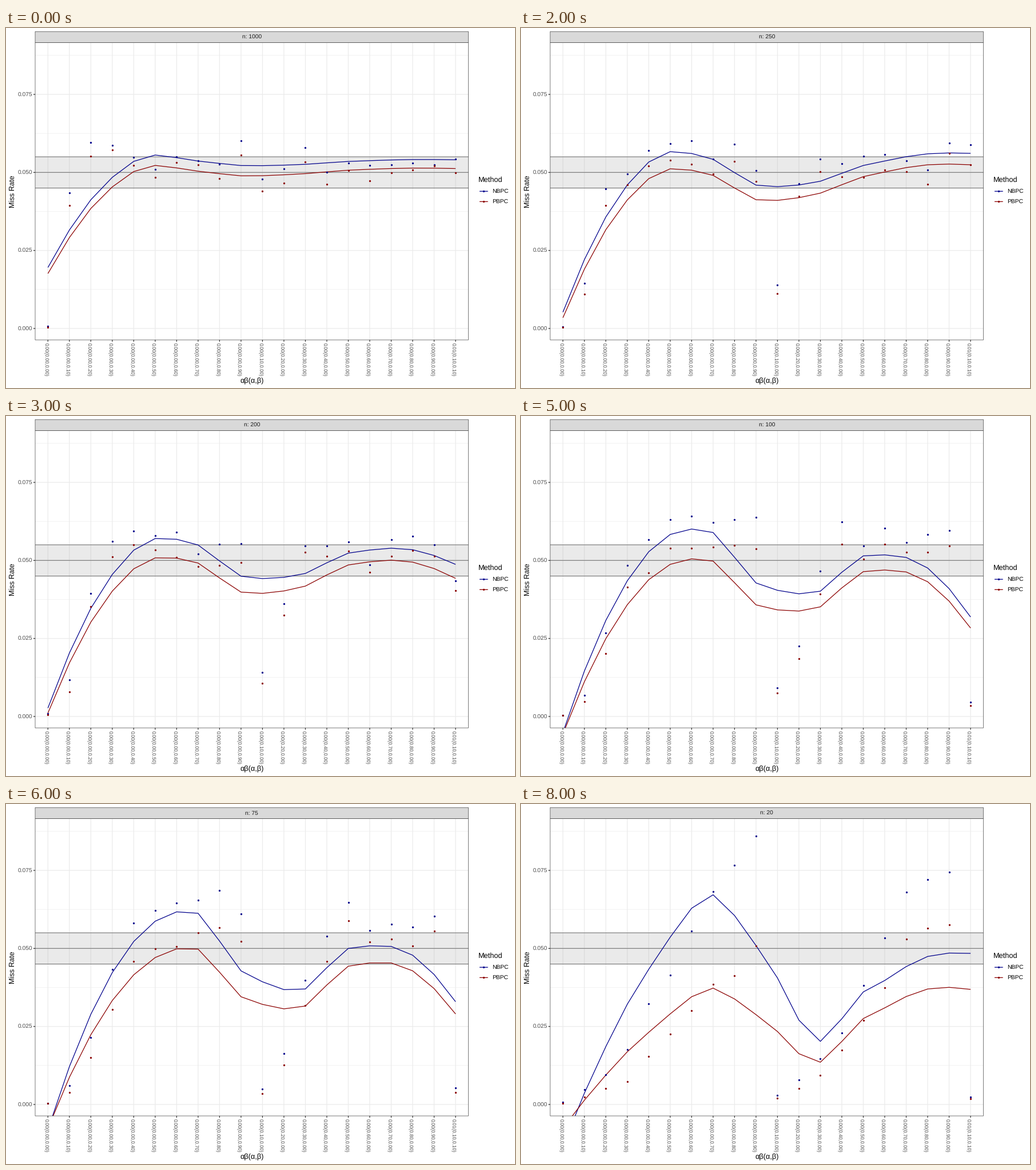
A matplotlib script for the animation above (9000 ms loop, 890x629 px).

```python
import math

import numpy as np
import matplotlib.pyplot as plt
from matplotlib.animation import FuncAnimation
from matplotlib.patches import Rectangle

W, H, DPI = 890, 629, 100
PT = 72 / DPI  # points per pixel
LEFT, RIGHT, TOP, BOTTOM = 51.0, 808.5, 25.5, 545.0
MID = (LEFT + RIGHT) / 2
DARK, GRID, INK = "#333333", "#EBEBEB", "#4D4D4D"
LW, EDGE = 1.25, 0.65
BIG, SMALL, TINY = 12.8, 10.25, 8.7  # text sizes in pixels

plt.rcParams.update({"font.family": "Liberation Sans", "text.hinting": "none"})

SIZES = [1000, 500, 250, 200, 150, 100, 75, 50, 20]
REPS = 5000

# (alpha, beta): beta alone rises, then alpha alone, then both are 0.1
X = np.arange(20)
ALPHA = np.where(X > 9, (X - 9) / 10, 0)
BETA = np.where(X < 10, X / 10, 0)
ALPHA[-1] = BETA[-1] = 0.1

# Large-sample rate, small-sample excess when beta or alpha rises, and threshold
METHODS = {
    "NBPC": dict(color="#00008B", base=0.0535, beta=0.68, alpha=0.52, cut=2.20),
    "PBPC": dict(color="#8B0000", base=0.0510, beta=0.00, alpha=0.25, cut=2.33),
}

normal_cdf = np.vectorize(lambda z: 0.5 * (1 + math.erf(z / math.sqrt(2))))


def miss_rate(n, base, beta, alpha, cut):
    """Expected rate: a level times the power to detect the larger effect."""
    level = base + np.where(ALPHA > 0, alpha, beta) / n
    signal = np.maximum(ALPHA, BETA) * math.sqrt(n)
    power = normal_cdf(signal - cut)
    both = (ALPHA > 0) & (BETA > 0)
    power = power + both * normal_cdf(5.5 * (signal - 1.4))
    return level * np.minimum(power, 1)


def simulate(n, rate, shared, rng):
    """Rates from REPS runs; both methods see mostly the same noise."""
    z = 0.95 * shared + 0.3 * rng.standard_normal(len(X))
    noisy = rate + z * np.sqrt(rate * (1 - rate) / REPS)
    return np.maximum(np.round(noisy * REPS), 2) / REPS


KNOTS = np.array([-0.095, 2, 4, 7, 9, 12, 14, 17, 19.095])
SPAN = 15  # neighbours in each local fit


def local_fit(v, y):
    """Value and slope at v of a tricube-weighted local quadratic."""
    d = np.abs(X - v)
    w = np.clip(1 - (d / np.sort(d)[SPAN - 1]) ** 3, 0, 1) ** 3
    _, slope, value = np.polyfit(X - v, y, 2, w=np.sqrt(w))
    return value, slope


def loess(y):
    """Local fits at the knots, joined by cubic Hermite pieces."""
    val, slope = np.array([local_fit(v, y) for v in KNOTS]).T
    i = np.searchsorted(KNOTS, X, side="right") - 1
    step = KNOTS[i + 1] - KNOTS[i]
    t = (X - KNOTS[i]) / step
    return (val[i] * (1 + 2 * t) * (1 - t) ** 2
            + val[i + 1] * t * t * (3 - 2 * t)
            + step * slope[i] * t * (1 - t) ** 2
            - step * slope[i + 1] * t * t * (1 - t))


def px(i):
    return 73.3 + 37.515 * np.asarray(i)


def py(v):
    return 525.0 - 5453 * np.asarray(v)


fig = plt.figure(figsize=(W / DPI, H / DPI), dpi=DPI, facecolor="white")
ax = fig.add_axes([0, 0, 1, 1])
ax.set_xlim(0, W)
ax.set_ylim(H, 0)
ax.axis("off")


def line(x, y, color, width=LW, z=1):
    return ax.plot(x, y, color=color, lw=width * PT, zorder=z, snap=False,
                   solid_capstyle="butt", solid_joinstyle="round")[0]


def dots(x, y, color, z=5):
    return ax.plot(x, y, "o", color=color, ms=3.3 * PT, mew=0, zorder=z,
                   snap=False)[0]


def box(x0, y0, x1, y1, **kw):
    return ax.add_patch(Rectangle((x0, y0), x1 - x0, y1 - y0, snap=False, **kw))


def text(x, y, s, size, color="black", ha="left", rot=0):
    return ax.text(x, y, s, fontsize=size * PT, color=color, ha=ha,
                   va="baseline", rotation=rot, rotation_mode="anchor", zorder=8)


# Grid, band and reference lines
for v in np.arange(0.0125, 0.09, 0.025):
    line([LEFT, RIGHT], [py(v)] * 2, GRID, LW / 2)
for v in np.arange(4) * 0.025:
    line([LEFT, RIGHT], [py(v)] * 2, GRID)
for x in px(X):
    line([x, x], [TOP, BOTTOM], GRID)
box(LEFT, py(0.055), RIGHT, py(0.045), fc="#999999", alpha=0.2, lw=0, zorder=2)
for v in (0.045, 0.05, 0.055):
    line([LEFT, RIGHT], [py(v)] * 2, "#7F7F7F", z=3)

# Panel and strip
panel = box(LEFT, TOP, RIGHT, BOTTOM, fc="none", ec=DARK, lw=EDGE * PT, zorder=7)
box(LEFT, 6.2, RIGHT, TOP, fc="#D9D9D9", ec=DARK, lw=EDGE * PT, zorder=7)
title = text(MID, 19.3, "", SMALL, "#1A1A1A", "center")

# Axes
for v in np.arange(4) * 0.025:
    line([LEFT - 3.1, LEFT], [py(v)] * 2, DARK)
    text(45.8, py(v) + 3.6, f"{v:.3f}", SMALL, INK, "right")
for x, a, b in zip(px(X), ALPHA, BETA):
    line([x, x], [BOTTOM, BOTTOM + 3.1], DARK)
    text(x - 6.2, 549.8, f"{a * b:.2f}({a:.2f},{b:.2f})", TINY, INK, rot=270)
text(MID, 620.3, "αβ(α,β)", BIG, ha="center")
text(15.3, (TOP + BOTTOM) / 2, "Miss Rate", BIG, ha="center", rot=90)

# Legend and data series
text(825.8, 268.8, "Method", BIG)
series = []
for k, (name, rule) in enumerate(METHODS.items()):
    color = rule.pop("color")
    y = 285.3 + 18 * k
    line([828, 842.7], [y, y], color)
    dots([835.4], [y], color)
    text(850.3, y + 3.7, name, SMALL)
    curve = line(px(X), px(X), color, z=4 + k / 2)
    curve.set_clip_path(panel)
    series.append((rule, curve, dots(px(X), px(X), color, 5 + k / 2)))


def update(k):
    n = SIZES[k]
    rng = np.random.default_rng(n)
    shared = rng.standard_normal(len(X))
    title.set_text(f"n: {n}")
    for rule, curve, marks in series:
        rate = miss_rate(n, **rule)
        curve.set_ydata(py(loess(rate)))
        marks.set_ydata(py(simulate(n, rate, shared, rng)))
    return [title] + [a for s in series for a in s[1:]]


anim = FuncAnimation(fig, update, frames=len(SIZES), interval=1000,
                     repeat=True, repeat_delay=0, blit=False)
plt.show()
```
